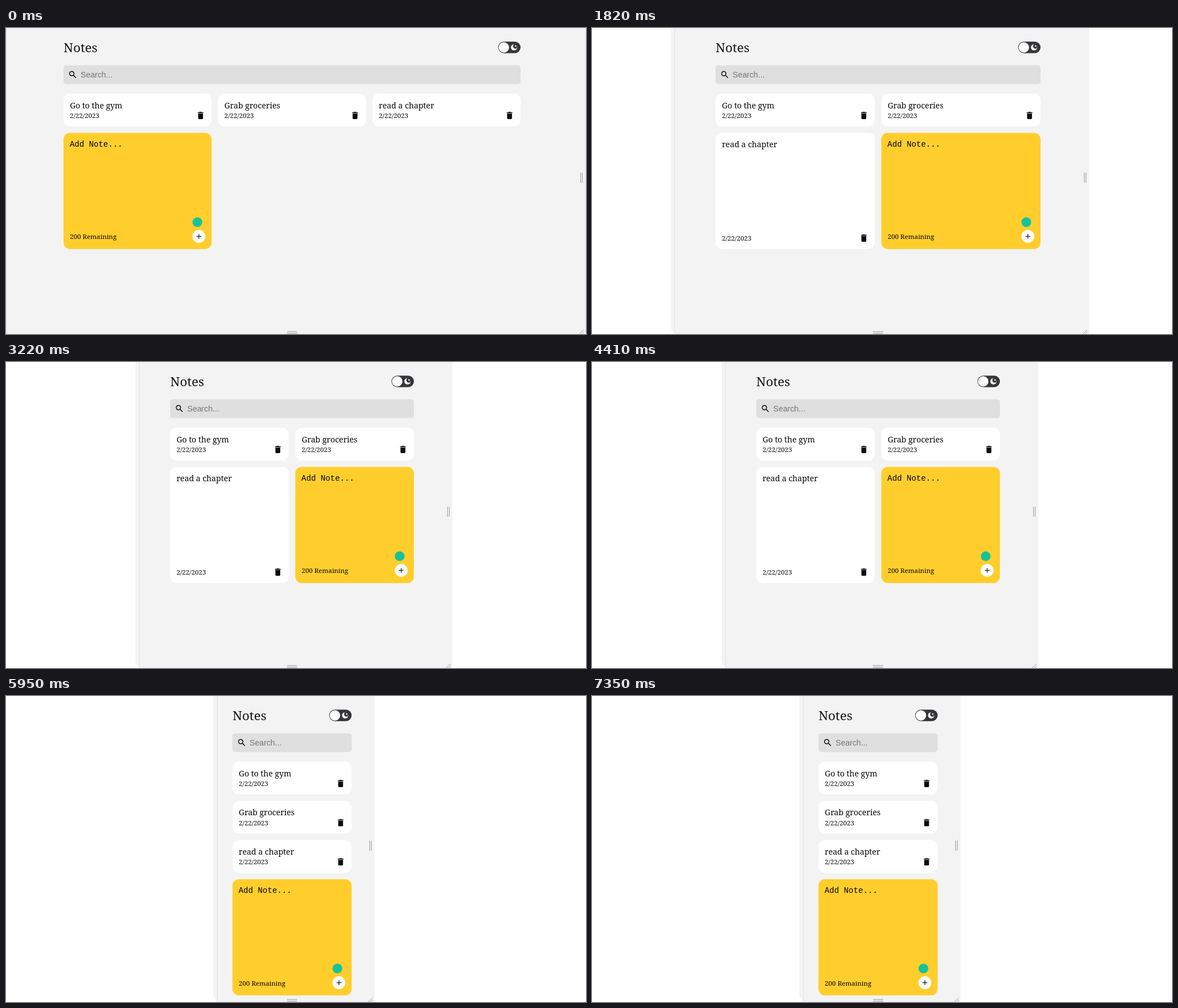
An HTML page with a canvas for the animation above (7630 ms loop, 1028 by 544 pixels).

```html
<!DOCTYPE html>
<html lang="en">
<head>
<meta charset="utf-8">
<title>Notes</title>
<style>
html, body { margin: 0; width: 100%; height: 100%; overflow: hidden; background: #fff; }
canvas { display: block; width: 1028px; height: 544px; }
</style>
</head>
<body>
<canvas id="stage" width="1028" height="544"></canvas>
<script>
const ctx = document.getElementById('stage').getContext('2d');
const LOOP = 7630;
const U = 0.715; // page zoom
const GAP = 16 * U;
const SHORT = 58.2, TALL = 206.5, TOP = 116.8;
const SERIF = '"Noto Serif", serif';
const SANS = '"Liberation Sans", Arial, sans-serif';
const MONO = '"Liberation Mono", "Courier New", monospace';
const TITLE_SIZE = 22.5, NOTE_SIZE = 14.15, SMALL_SIZE = 11.65, INPUT_SIZE = 14.2;
const NOTES = ['Go to the gym', 'Grab groceries', 'read a chapter'];
const DATE = '2/22/2023';
const INK = '#060606', PAGE = '#f3f3f3', DARK = '#38363a';

const TRASH = new Path2D('M6 19c0 1.1.9 2 2 2h8c1.1 0 2-.9 2-2V7H6v12zM19 4h-3.5l-1-1h-5l-1 1H5v2h14V4z');
const LENS = new Path2D('M15.5 14h-.79l-.28-.27A6.47 6.47 0 0 0 16 9.5 6.5 6.5 0 1 0 9.5 16c1.61 0 3.09-.59 4.23-1.57l.27.28v.79l5 4.99L20.49 19l-4.99-5zm-6 0C7 14 5 12 5 9.5S7 5 9.5 5 14 7 14 9.5 12 14 9.5 14z');

// Window sizes: start time, panel edges, content edges, columns
const SIZES = [
  { at: 0, x0: 0, x1: 1027, left: 102, right: 912, cols: 3 },
  { at: 1820, x0: 147, x1: 881, left: 219, right: 795, cols: 2 },
  { at: 3220, x0: 237, x1: 791, left: 291, right: 723, cols: 2 },
  { at: 4550, x0: 357.5, x1: 670, left: 387.4, right: 626.6, cols: 1 },
  { at: 5950, x0: 375, x1: 653, left: 401.4, right: 612.6, cols: 1 }
];

function box(x, y, w, h, r, color) {
  ctx.fillStyle = color;
  ctx.beginPath();
  ctx.roundRect(x, y, w, h, r);
  ctx.fill();
}

function dot(x, y, r, color) {
  ctx.fillStyle = color;
  ctx.beginPath();
  ctx.arc(x, y, r, 0, Math.PI * 2);
  ctx.fill();
}

function line(x0, y0, x1, y1, color, width = 1) {
  ctx.strokeStyle = color;
  ctx.lineWidth = width;
  ctx.beginPath();
  ctx.moveTo(x0, y0);
  ctx.lineTo(x1, y1);
  ctx.stroke();
}

function text(str, x, y, size, family, color = INK) {
  ctx.font = `${size}px ${family}`;
  ctx.fillStyle = color;
  ctx.fillText(str, x, y);
}

// 24-unit icon centred on x, y
function icon(path, x, y) {
  ctx.save();
  ctx.translate(x, y);
  ctx.scale(U, U);
  ctx.translate(-12, -12);
  ctx.fillStyle = '#0c0c0c';
  ctx.fill(path);
  ctx.restore();
}

function drawPanel({ x0, x1 }) {
  ctx.fillStyle = '#fff';
  ctx.fillRect(0, 0, 1028, 544);
  if (x0 > 0) box(x0 - 7.5, 0, 30, 543, [0, 0, 0, 13], '#f4f4f4');
  ctx.fillStyle = PAGE;
  ctx.fillRect(x0, 0, x1 - x0, 544);
  const edge = Math.floor(x0 ? x0 - 1 : 0) + 0.5;
  line(edge, 0, edge, 544, '#e2e2e2');
  if (x1 === 1027) line(1027.5, 0, 1027.5, 544, '#e2e2e2');

  const grip = '#999';
  for (const dx of [8.5, 5.5]) line(x1 - dx, 257, x1 - dx, 275, grip);
  for (const y of [539.5, 542.5]) line(498, y, 516, y, grip);
  line(x1 - 11, 544, x1 - 3, 536.5, grip);
  line(x1 - 6.5, 544, x1 - 3, 540.5, grip);
}

function drawToggle(right) {
  box(right - 39.8, 24.3, 39.8, 20.4, 10.2, DARK);
  dot(right - 29.6, 34.5, 9.3, '#fff');
  const x = right - 11.4, y = 34.4;
  dot(x, y, 5.6, '#fff');
  dot(x + 2.5, y - 2.1, 4.5, DARK);
  dot(x + 2.6, y - 2.3, 1.3, '#fff');
  dot(x + 5, y + 0.3, 0.6, '#fff');
}

function drawHeader({ left, right }) {
  text('Notes', left, 43, TITLE_SIZE, SERIF, '#161616');
  drawToggle(right);
  box(left, 66.2, right - left, 33.5, 5, '#dfdfdf');
  icon(LENS, left + 16.4, 82.9);
  text('Search...', left + 30.3, 88, INPUT_SIZE, SANS, '#757575');
}

function drawNote(title, x, y, w, h) {
  box(x, y, w, h, 11.4, '#fff');
  text(title, x + 11.2, y + 26, NOTE_SIZE, SERIF);
  text(DATE, x + 11.2, y + h - 15, SMALL_SIZE, SERIF);
  icon(TRASH, x + w - 19.5, y + h - 19.5);
}

function drawEditor(x, y, w) {
  const right = x + w;
  box(x, y, w, TALL, 11.4, '#ffce2c');
  text('Add Note...', x + 10.9, y + 24.2, INPUT_SIZE, MONO, '#000');
  text('200 Remaining', x + 11.2, y + 188.9, SMALL_SIZE, SERIF);
  dot(right - 25.2, y + 158.7, 8.6, '#15c39a');
  const cx = right - 22.5, cy = y + 184;
  dot(cx, cy, 11.4, '#fff');
  line(cx - 4.2, cy, cx + 4.2, cy, '#111', 1.2);
  line(cx, cy - 4.2, cx, cy + 4.2, '#111', 1.2);
}

function drawGrid({ left, right, cols }) {
  const w = (right - left - GAP * (cols - 1)) / cols;
  const total = NOTES.length + 1;
  let y = TOP;
  for (let start = 0; start < total; start += cols) {
    const end = Math.min(start + cols, total);
    const h = end === total ? TALL : SHORT;
    for (let i = start; i < end; i++) {
      const x = left + (i - start) * (w + GAP);
      if (i < NOTES.length) drawNote(NOTES[i], x, y, w, h);
      else drawEditor(x, y, w);
    }
    y += h + GAP;
  }
}

function render(now) {
  const t = now % LOOP;
  const size = SIZES.filter(s => s.at <= t).pop();
  drawPanel(size);
  drawHeader(size);
  drawGrid(size);
}

function tick(now) {
  render(now);
  requestAnimationFrame(tick);
}
render(0);
requestAnimationFrame(tick);
</script>
</body>
</html>
```
